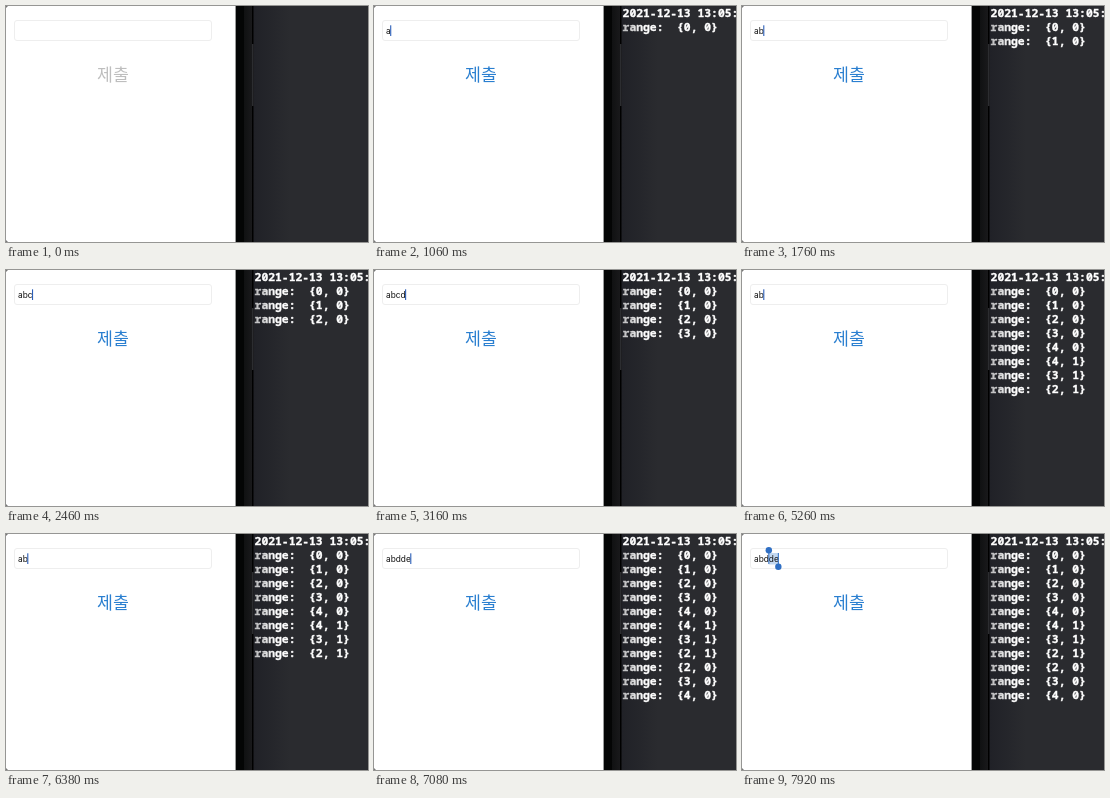
Write an HTML page with a canvas that moves like this. It is 362 px wide and 236 px high and loops after 7.99 s.

```html
<!DOCTYPE html>
<html lang="ko">
<head>
<meta charset="utf-8">
<title>Text field log</title>
<style>
  html, body { margin: 0; width: 100%; height: 100%; overflow: hidden; background: #fff; }
  canvas { display: block; width: 362px; height: 236px; }
</style>
</head>
<body>
<canvas id="stage"></canvas>
<script>
const W = 362, H = 236, LOOP = 7990;
const canvas = document.getElementById('stage');
const ratio = window.devicePixelRatio || 1;
canvas.width = Math.round(W * ratio);
canvas.height = Math.round(H * ratio);
const ctx = canvas.getContext('2d');
ctx.scale(ratio, ratio);

const FIELD_FONT = '8.3px Inter, sans-serif';
const BUTTON_FONT = '17.3px "Noto Sans CJK KR", "Noto Sans CJK", sans-serif';
const LOG_FONT = 'bold 11.35px "Noto Sans Mono", monospace';
const TEXT_X = 12, LOG_X = 248.6, LINE = 14;
const HEADER = '2021-12-13 13:05:';

// time, field text, logged location and length
const edits = [
  [1060, 'a', 0, 0],
  [1760, 'ab', 1, 0],
  [2390, 'abc', 2, 0],
  [2950, 'abcd', 3, 0],
  [3510, 'abcde', 4, 0],
  [4000, 'abcd', 4, 1],
  [4630, 'abc', 3, 1],
  [5260, 'ab', 2, 1],
  [6450, 'abd', 2, 0],
  [6660, 'abdd', 3, 0],
  [7080, 'abdde', 4, 0]
];

// time, caret opacity
const caretSteps = [
  [0, 0], [640, 1],
  [1550, 0.65], [1620, 0.3], [1690, 0], [1760, 1],
  [5890, 0.65], [5960, 0.3], [6030, 0],
  [6240, 0.35], [6310, 0.7], [6380, 1], [7710, 0]
];

const handleSteps = [[0, 0], [7710, 0.4], [7780, 0.8], [7850, 1.12], [7920, 1]];

function stepAt(steps, t) {
  let value = 0;
  for (const [start, v] of steps) if (t >= start) value = v;
  return value;
}

function rect(x, y, w, h, color) {
  ctx.fillStyle = color;
  ctx.fillRect(x, y, w, h);
}

function label(text, x, y, font, color, weight = 0) {
  ctx.font = font;
  ctx.fillStyle = ctx.strokeStyle = color;
  ctx.fillText(text, x, y);
  if (weight) {
    ctx.lineWidth = weight;
    ctx.strokeText(text, x, y);
  }
}

function fade(x0, x1, from, to) {
  const g = ctx.createLinearGradient(x0, 0, x1, 0);
  g.addColorStop(0, from);
  g.addColorStop(1, to);
  return g;
}

function textEnd(text) {
  ctx.font = FIELD_FONT;
  return TEXT_X + ctx.measureText(text).width;
}

function corner(y, dy) {
  ctx.fillStyle = '#777';
  ctx.beginPath();
  ctx.moveTo(0, y);
  ctx.lineTo(2, y);
  ctx.lineTo(0, y + dy);
  ctx.fill();
}

function drawBackdrop() {
  rect(0, 0, W, H, '#fff');
  corner(0, 2);
  corner(H, -2);
  rect(247, 0, W - 247, H, fade(247, 284, '#202127', '#2a2b2f'));
  // phone edge
  rect(229.6, 0, 9.4, H, '#040505');
  rect(238, 0, 8, H, fade(238, 246, '#101112', '#19191b'));
  rect(246, 0, 1.5, H, '#000');
  // side button
  rect(246, 38, 1.5, 62, '#2c2d30');
}

function drawHandle(x, barY, dotY, scale) {
  rect(x - 0.5, barY, 1, 12, '#2f6fc4');
  ctx.beginPath();
  ctx.arc(x, dotY, 3.2 * scale, 0, Math.PI * 2);
  ctx.fill();
}

function drawField(text, t) {
  ctx.strokeStyle = '#eee';
  ctx.lineWidth = 1;
  ctx.beginPath();
  ctx.roundRect(8.5, 14.5, 197, 20, 2.5);
  ctx.stroke();

  const scale = stepAt(handleSteps, t);
  const end = textEnd(text);
  const start = textEnd('abd');
  if (scale) rect(start, 19, end - start, 11.5, '#c2d8f1');
  label(text, TEXT_X, 28, FIELD_FONT, '#111');
  if (scale) {
    drawHandle(start, 18, 16.3, scale);
    drawHandle(end - 0.4, 19, 32.7, scale);
  }
  ctx.globalAlpha = stepAt(caretSteps, t);
  rect(end - 0.5, 19.3, 1.1, 10.7, '#2c5fb8');
  ctx.globalAlpha = 1;
}

function drawLog(done, t) {
  if (t >= 500) label(HEADER, LOG_X, 11, LOG_FONT, '#fff', 0.35);
  const ink = fade(248, 270, '#b8b8ba', '#fff');
  done.forEach(([, , loc, len], i) => {
    label(`range:  {${loc}, ${len}}`, LOG_X, 11 + LINE * (i + 1), LOG_FONT, ink, 0.35);
  });
}

function draw(t) {
  const done = edits.filter(e => t >= e[0]);
  const text = done.length ? done[done.length - 1][1] : '';
  drawBackdrop();
  drawField(text, t);
  ctx.textAlign = 'center';
  label('제출', 107, 75.4, BUTTON_FONT, text ? '#2a7fd0' : '#bebebe');
  ctx.textAlign = 'left';
  drawLog(done, t);
}

const began = performance.now();
function tick() {
  draw((performance.now() - began) % LOOP);
  requestAnimationFrame(tick);
}
tick();
</script>
</body>
</html>
```
